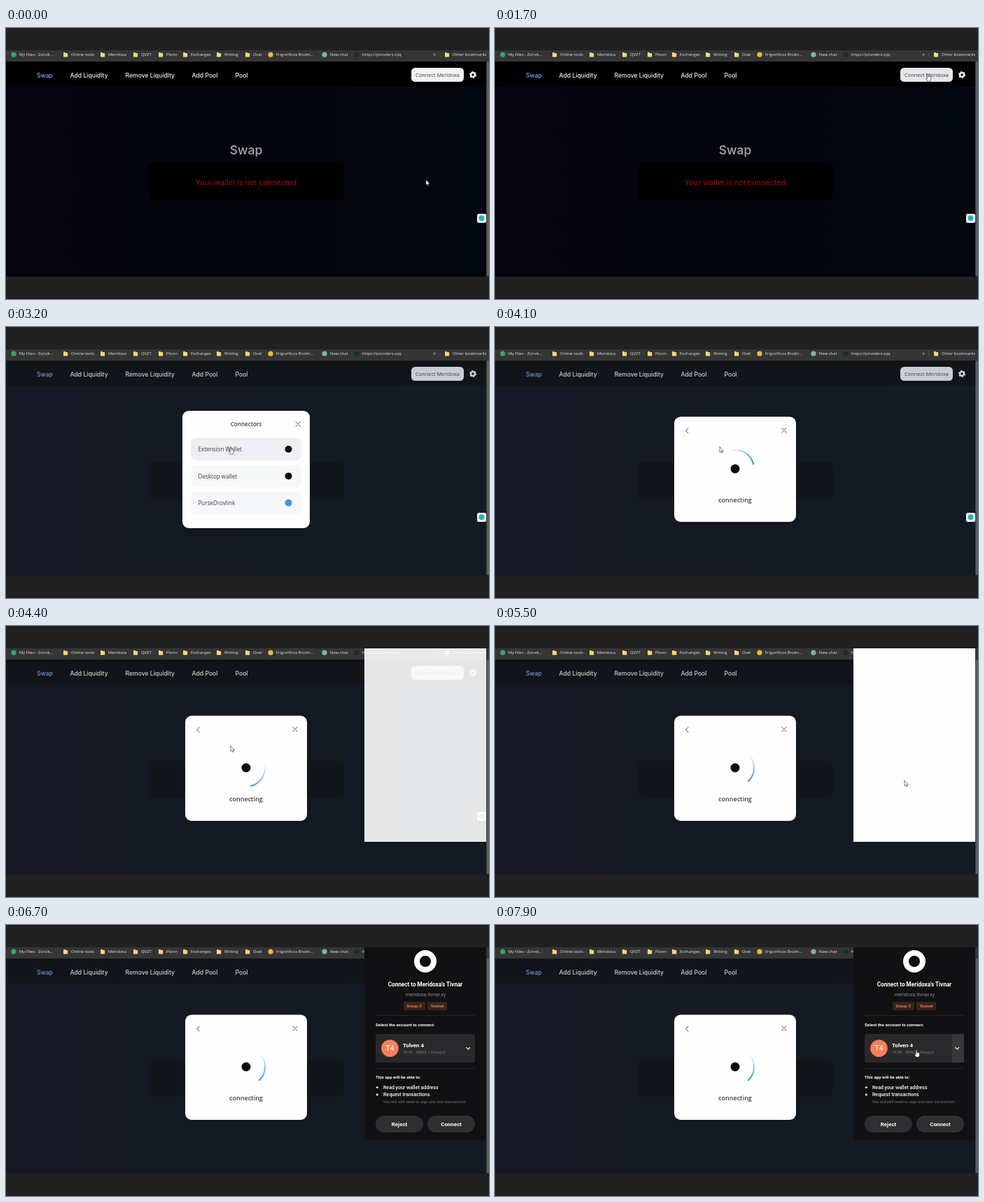
An HTML page that plays this animation: 690 by 388 pixels, repeating every 8000 ms.

```html
<!DOCTYPE html>
<html lang="en">
<head>
<meta charset="utf-8">
<title>Wallet connection</title>
<style>
  html, body { margin: 0; width: 100%; height: 100%; overflow: hidden; background: #212121; }
  svg { display: block; width: 100%; height: 100%; }
  text { white-space: pre; }
  .mid { text-anchor: middle; }
  .bar { font: 5.9px "Open Sans", sans-serif; fill: #e4e4e4; }
  .nav { font: 500 8.6px Inter, sans-serif; fill: #f2f2f2; }
  .kit { font: 500 8.1px "Open Sans", sans-serif; fill: #3b3d42; }
  .pop { font-family: Roboto, sans-serif; fill: #fff; }
  .bold { font-weight: 700; }
  .line { fill: none; stroke-linecap: round; stroke-linejoin: round; }
</style>
</head>
<body>
<svg viewBox="0 0 690 388">
  <defs>
    <linearGradient id="night">
      <stop offset="0" stop-color="#05040f"/>
      <stop offset=".5" stop-color="#03040c"/>
      <stop offset="1" stop-color="#02070f"/>
    </linearGradient>
    <linearGradient id="tail" gradientUnits="userSpaceOnUse" x1="0" y1="-27" x2="27" y2="0">
      <stop offset="0" stop-color="#2a97dd" stop-opacity="0"/>
      <stop offset="1" stop-color="#2490dc"/>
    </linearGradient>
    <path id="folder" d="M0 .6Q0 0 .6 0H2.6L3.4 1H5.6Q6.2 1 6.2 1.6V5.8Q6.2 6.4 5.6 6.4H.6Q0 6.4 0 5.8Z" fill="#f7d774"/>
    <path id="cross" class="line" d="M-3-3L3 3M3-3L-3 3" stroke="#8e9096" stroke-width="1.2"/>
  </defs>

  <rect width="690" height="388" fill="#212121"/>
  <rect y="32" width="690" height="16" fill="#353536"/>
  <g id="bookmarks" class="bar"></g>

  <!-- Page -->
  <rect y="48" width="686" height="308" fill="url(#night)"/>
  <rect y="48" width="686" height="36" fill="#000"/>
  <g id="nav" class="nav"></g>
  <rect id="connect" x="579" y="57" width="75" height="20" rx="5.5"/>
  <text class="kit mid" x="616.5" y="69.8" style="font-size:7.4px;font-weight:400">Connect Meridoxa</text>
  <g fill="none" stroke="#f5f5f5">
    <circle cx="667" cy="67" r="2.9" stroke-width="2.3"/>
    <circle cx="667" cy="67" r="4.3" stroke-width="1.5" stroke-dasharray="2.2 2.303"/>
  </g>
  <text class="mid" x="343" y="181" font-family="Inter, sans-serif" font-size="17.5" font-weight="500" fill="#aaaaac">Swap</text>
  <rect x="204" y="193" width="279" height="53" rx="8" fill="#000"/>
  <text class="mid" x="343" y="224.7" font-family="Inter, sans-serif" font-size="10.7" font-weight="500" fill="#910a14">Your wallet is not connected</text>
  <rect id="dim" y="48" width="686" height="308" fill="#47586b"/>
  <rect x="686" y="48" width="4" height="308" fill="#2c2c2e"/>
  <rect x="686.5" y="48" width="3.5" height="307" rx="1.5" fill="#5c5c5f"/>
  <rect x="673" y="266" width="13" height="13" rx="2.5" fill="#f2f6f7"/>
  <circle cx="679.5" cy="272.3" r="4" fill="#22b5c4"/>

  <!-- Dialog -->
  <g id="dialog">
    <rect id="panel" rx="9" fill="#fefefe"/>
    <g id="choices">
      <text class="kit mid" x="343" y="142.3" style="font-weight:600">Connectors</text>
      <use href="#cross" x="417" y="139"/>
      <g id="rows"></g>
    </g>
    <g id="waiting">
      <path class="line" d="M276 145L272.7 148.5L276 152" stroke="#8e9096" stroke-width="1.2"/>
      <use href="#cross" x="413" y="148"/>
      <circle cx="343" cy="203" r="6.5" fill="#0b0b0b"/>
      <path id="spinner" class="line" d="M-2.35-26.9A27 27 0 0 1 27 0" stroke="url(#tail)" stroke-width="2"/>
      <text class="kit mid" x="343" y="250.8" style="font-size:9px;font-weight:600">connecting</text>
    </g>
  </g>

  <!-- Wallet window -->
  <rect id="blank" x="512" y="32" width="174" height="277" fill="#fdfdfd"/>
  <g id="wallet" class="pop">
    <rect x="512" y="32" width="174" height="276.5" fill="#111114"/>
    <circle cx="599" cy="52" r="16" fill="#fff"/>
    <circle cx="599" cy="52" r="8" fill="#0b0b0b"/>
    <text class="mid bold" x="599" y="88" font-size="8.2">Connect to Meridoxa's Tivnar</text>
    <text class="mid" x="599.5" y="101.5" font-size="7.1" fill="#8b8b8e">meridoxa.tivnar.xy</text>
    <g fill="#38231d">
      <rect x="568" y="110" width="31" height="12" rx="2"/>
      <rect x="602" y="110" width="28" height="12" rx="2"/>
    </g>
    <g class="mid" font-size="5.7" font-weight="500" fill="#f28b64">
      <text x="583.3" y="118.1">Group: 0</text>
      <text x="616" y="118.1">Testnet</text>
    </g>
    <path d="M528 129.5H670M528 205.5H670" stroke="#3a3a3d" stroke-width=".8" stroke-dasharray="1.5 1"/>
    <text class="bold" x="528" y="145.2" font-size="6.2">Select the account to connect:</text>
    <rect x="528" y="156" width="142" height="41" rx="3" fill="#29292c"/>
    <rect id="cell" x="653" y="156" width="17" height="41" rx="3" fill="#38383b"/>
    <circle cx="548.5" cy="176.5" r="12.3" fill="#f97f5b"/>
    <text class="mid" x="548.5" y="180.2" font-size="10.5">T4</text>
    <text class="bold" x="567" y="175.3" font-size="8">Tolven 4</text>
    <text x="567" y="184.3" font-size="6" fill="#77777b">7K28...3M6Z / Group:0</text>
    <path class="line" d="M657.8 175.4L660.3 177.9L662.8 175.4" stroke="#fff" stroke-width="1.2"/>
    <text class="bold" x="528" y="220.2" font-size="6.1">This app will be able to:</text>
    <circle cx="530.3" cy="232.6" r="1.4"/>
    <circle cx="530.3" cy="243" r="1.4"/>
    <g font-size="7" font-weight="500">
      <text x="539" y="235">Read your wallet address</text>
      <text x="539" y="245.3">Request transactions</text>
    </g>
    <text x="538.5" y="255.3" font-size="5.9" fill="#77777b">You will still need to sign any new transaction</text>
    <g fill="#2f2f31">
      <rect x="528" y="273" width="68" height="24" rx="12"/>
      <rect x="602" y="273" width="68" height="24" rx="12"/>
    </g>
    <g class="mid bold" font-size="7.9">
      <text x="562" y="288">Reject</text>
      <text x="636" y="288">Connect</text>
    </g>
  </g>

  <g id="cursor" fill="#fff" stroke="#222" stroke-width=".6" stroke-linejoin="round">
    <path id="arrow" d="M0 0V8L1.8 6.4L3 9.1L4.2 8.5L3 6H5.3Z"/>
    <path id="hand" d="M-.8.7Q0-.5.8.7V4L3.6 4.5Q4.7 4.8 4.6 6L4 9.2L3.4 10.6H-.5L-2.6 7.3Q-2.9 6.2-1.8 6.3L-.8 7.2Z"/>
  </g>
</svg>

<script>
const LOOP = 8000;
const $ = id => document.getElementById(id);
const label = (x, y, s, extra = "") => `<text x="${x}" y="${y}" ${extra}>${s}</text>`;
const dot = (x, y, r, fill) => `<circle cx="${x}" cy="${y}" r="${r}" fill="${fill}"/>`;

// Bookmarks: text x, text, icon colour (folder when absent)
$("bookmarks").innerHTML = [
  [19, "My Files - Zorvik...", "#35a866"], [93, "Online tools"], [146, "Meridoxa"],
  [193, "QVZT"], [229, "Plonn"], [264, "Exchanges"], [312, "Writing"], [353, "Ovel"],
  [386, "Frigorificos Brolm...", "#e9b93a"], [463, "New chat", "#7cb5a6"],
  [509, "https://plonders.xyq", "#16302f"], [638, "Other bookmarks"]
].map(([x, name, color]) =>
  (color ? dot(x - 8, 38.2, 3.6, color) : `<use href="#folder" x="${x - 11}" y="35"/>`) + label(x, 40.3, name)
).join("") + label(610.5, 40.2, "»", 'font-size="7"') + '<path d="M620 34.5V42" stroke="#5a5a5c" stroke-width=".7"/>';

$("nav").innerHTML = [
  [44, "Swap"], [91.5, "Add Liquidity"], [170.5, "Remove Liquidity"], [265.5, "Add Pool"], [327.5, "Pool"]
].map(([x, name], i) => label(x, 70.7, name, i ? "" : 'fill="#78a6f5" style="fill:#78a6f5"')).join("");

$("rows").innerHTML = [
  ["Extension Wallet", "#0b0b0b"], ["Desktop wallet", "#0b0b0b"], ["PurseDrovlink", "#3a9be0"]
].map(([name, color], i) => {
  const y = 159 + i * 38.4;
  return `<rect x="264" y="${y}" width="158" height="32" rx="8" fill="#f6f7f9"/>` +
    label(274.5, y + 19.2, name, 'class="kit"') + dot(403.5, y + 16, 5, color);
}).join("");
const firstRow = $("rows").querySelector("rect");

const clamp = v => Math.min(1, Math.max(0, v));
const span = (t, start, length) => clamp((t - start) / length);
const smooth = u => u * u * (3 - 2 * u);
const easeOut = u => 1 - (1 - u) ** 2;
const mix = (a, b, u) => a + (b - a) * u;
const within = (t, start, end) => t >= start && t < end;
const fade = (id, v) => {
  $(id).setAttribute("opacity", v);
  $(id).style.display = v > 0 ? "" : "none";
};

// Pointer moves: start, duration, from, to
const moves = [
  [50, 700, [600, 217], [618.5, 65.5]],
  [2050, 850, [618.5, 65.5], [321, 171.5]],
  [4550, 800, [321, 171.5], [585, 221]],
  [7050, 600, [650, 231], [602, 178.5]]
];

function draw(t) {
  const opened = easeOut(span(t, 1750, 200));
  const morph = smooth(span(t, 3400, 250));
  const dark = t >= 6300;

  $("connect").setAttribute("fill", within(t, 650, 2100) ? "#e5e5ea" : "#f0f0f5");
  fade("dim", opened * 0.24);
  fade("dialog", opened);
  const scale = mix(0.96, 1, opened);
  $("dialog").setAttribute("transform", `translate(343 204) scale(${scale}) translate(-343 -204)`);
  const box = { x: mix(252, 256, morph), y: mix(120, 128.5, morph), width: mix(182, 174, morph), height: mix(168, 150.5, morph) };
  for (const key in box) $("panel").setAttribute(key, box[key]);
  fade("choices", 1 - clamp(morph * 2));
  fade("waiting", clamp(morph * 2 - 1));
  firstRow.setAttribute("fill", t >= 2750 ? "#eeeff4" : "#f6f7f9");
  $("spinner").setAttribute("transform", `translate(343 203) rotate(${45 + (t - 5500) * 0.3})`);

  fade("blank", dark ? 0 : easeOut(span(t, 4250, 220)));
  fade("wallet", dark ? 1 : 0);
  fade("cell", t >= 7500 ? 1 : 0);

  const [start, length, from, to] = moves.filter(m => m[0] <= t).pop() || moves[0];
  const u = smooth(span(t, start, length));
  $("cursor").setAttribute("transform", `translate(${mix(from[0], to[0], u)} ${mix(from[1], to[1], u)})`);
  fade("cursor", within(t, 6300, 7050) ? 0 : 1);
  const pointing = within(t, 650, 1800) || within(t, 2750, 3450) || t >= 7450;
  fade("hand", pointing ? 1 : 0);
  fade("arrow", pointing ? 0 : 1);
}

function tick() {
  draw(performance.now() % LOOP);
  requestAnimationFrame(tick);
}
tick();
</script>
</body>
</html>
```
